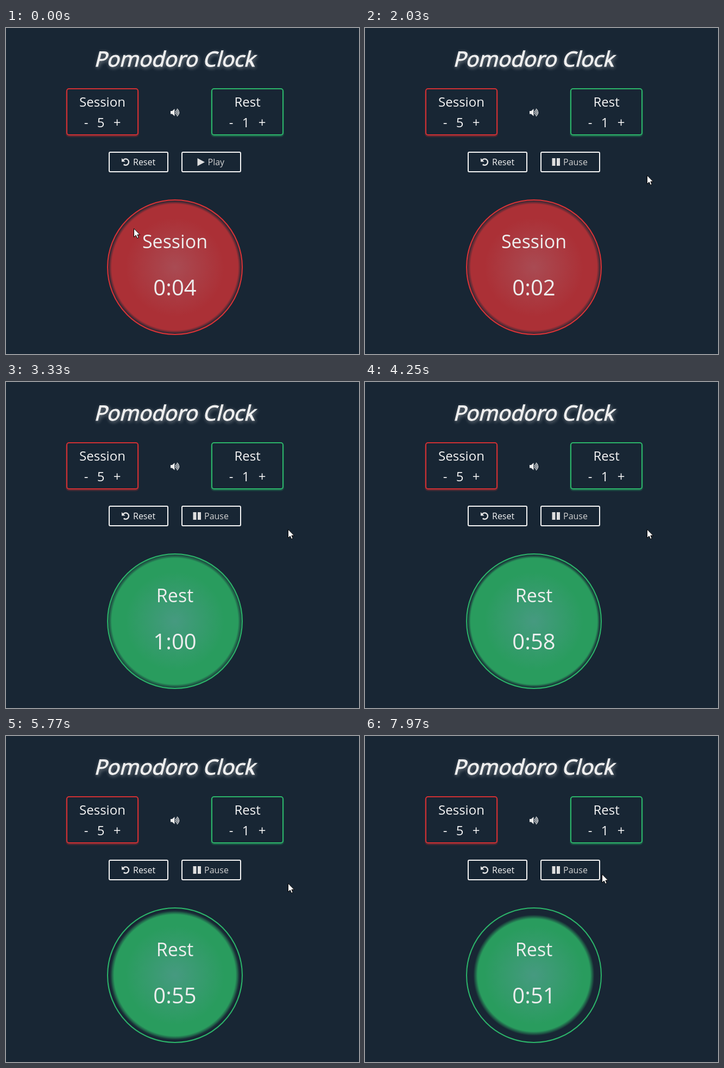
Recreate the animation shown at these times as an HTML page. Size 650x601 px, loop 8000 ms.

```html
<!DOCTYPE html>
<html lang="en">
<head>
<meta charset="utf-8">
<title>Pomodoro Clock</title>
<style>
  html, body { margin: 0; width: 100%; height: 100%; overflow: hidden; background: #182634; }
  svg { display: block; width: 650px; height: 601px; }
  text { font-family: "Open Sans", sans-serif; fill: #f4f4f4; }
  .mid { text-anchor: middle; }
  .box { fill: none; stroke-width: 2; }
  .set { font-size: 24px; }
  .btn { font-size: 16px; }
  .dim text { fill: #d2d2d2; }
  .dim path { fill: #dedede; }
  .title { font-size: 38.4px; fill: #eee; stroke: #eee; stroke-width: 1.2;
    text-shadow: 2px 2px 7px rgba(255, 255, 255, .35); }
</style>
</head>
<body>
<svg viewBox="0 0 650 601">
  <defs>
    <radialGradient id="fill" gradientUnits="userSpaceOnUse" cx="311" cy="441" r="130">
      <stop offset="0"/><stop offset=".7"/><stop/><stop stop-opacity=".5"/><stop stop-opacity="0"/>
    </radialGradient>
    <radialGradient id="rim" gradientUnits="userSpaceOnUse" cx="311" cy="441" r="123">
      <stop offset=".945" stop-color="#182634" stop-opacity="0"/>
      <stop offset=".972" stop-color="#182634" stop-opacity=".45"/>
      <stop offset="1" stop-color="#182634" stop-opacity=".75"/>
    </radialGradient>
    <filter id="soft" x="-10%" y="-10%" width="120%" height="130%">
      <feGaussianBlur stdDeviation="1.2"/>
    </filter>
  </defs>
  <rect width="650" height="601" fill="#182634"/>

  <text class="title" transform="translate(162 71) skewX(-14)">Pomodoro Clock</text>

  <g id="settings"></g>

  <g fill="#eee" stroke="none">
    <path d="M303 153h3l4.5-4v13.5l-4.500-4h-3z"/>
    <path d="M312.300 153.300q2.300 2.400 0 4.900M313.900 151.200q4.400 4.500 0 9.100M315.300 149.200q6.400 6.500 0 13"
      fill="none" stroke="#eee" stroke-width="1.4" stroke-linecap="round"/>
  </g>

  <rect class="box" x="190" y="229" width="108" height="36" rx="2" stroke="#f4f4f4"/>
  <path d="M215.800 243.600A5.700 5.700 0 1 1 216.700 251.500" fill="none" stroke="#e8e8e8" stroke-width="2.300"/>
  <path d="M213 240v6.500h6.500z" fill="#e8e8e8"/>
  <text class="btn" x="234" y="253">Reset</text>

  <rect id="toggle" class="box" x="324" y="229" width="108" height="36" rx="2" stroke="#f4f4f4"/>
  <g id="play" class="dim">
    <path d="M352.500 240v14.500l13.500-7.250z"/>
    <text class="btn" x="371.500" y="253">Play</text>
  </g>
  <g id="pause" class="dim">
    <path d="M344.500 240h6v14h-6zM353 240h6v14h-6z"/>
    <text class="btn" x="365" y="253">Pause</text>
  </g>

  <circle cx="311" cy="441" r="123" fill="url(#fill)"/>
  <circle cx="311" cy="441" r="123" fill="url(#rim)"/>
  <circle id="ring" cx="311" cy="441" r="124" fill="none" stroke-width="2"/>
  <text id="label" class="mid" x="311" y="406" font-size="34" style="fill:#eee"></text>
  <text id="time" class="mid" x="311" y="493" font-size="40" style="fill:#eee"></text>

  <path id="arrow" d="M.5 .8V16.500L4.200 13.100L6.600 18.500L9.200 17.400L6.900 12.100H11.600Z"
    fill="#fff" stroke="#000" stroke-width="1"/>
  <path id="hand" d="M5 14V2.200Q5 .6 6.500 .6T8 2.200V7.500Q8 6.300 9.400 6.300T11 7.800Q11.200 6.900 12.300 6.900T13.800 8.600
    Q14.100 7.900 15 7.900Q16.400 7.900 16.400 9.600V14.500Q16.400 17 14.500 18.800V21.500H6.500V19.200L1 12.800
    Q.2 11.600 1.200 10.800T3.200 11.300Z" fill="#fff" stroke="#000" stroke-width="1"/>
</svg>
<script>
const $ = id => document.getElementById(id);
const LOOP = 8000;
const SESSION = { name: "Session", line: "#dc3336", core: "#a94b53", edge: "#ab3036" };
const REST = { name: "Rest", line: "#2cb56a", core: "#469a80", edge: "#299c5e" };

// start time, cursor shape, left, top
const MOVES = [
  [0, "arrow", 235, 369], [170, "arrow", 305, 309], [320, "arrow", 329, 272],
  [470, "hand", 331, 262], [640, "hand", 343, 248], [790, "hand", 343, 246],
  [1110, "hand", 347, 245], [1260, "arrow", 471, 258], [1430, "arrow", 519, 271],
  [7970, "arrow", 436, 254]
];
const PRESS = 790, RELEASE = 960;
const TICKS = [1580, 2030, 2510, 2820, 3330, 3760, 4250, 4850, 5310, 5770, 6230, 6700, 7330, 7800];
const SESSION_LEFT = 4, REST_LENGTH = 60, FULL = 123;

function settingBox(x, name, value, color) {
  const item = (dx, y, s) => `<text class="set mid" x="${x + dx}" y="${y}">${s}</text>`;
  return `<rect class="box" x="${x + 1}" y="114" width="131" height="85" rx="4" stroke="${color}" opacity=".6" filter="url(#soft)"/>
    <rect class="box" x="${x + 1}" y="112" width="131" height="85" rx="4" stroke="${color}" style="fill:#182634"/>` +
    item(66.5, 145, name) + item(36.5, 183, "-") + item(63.5, 183, value) + item(93.5, 183, "+");
}
$("settings").innerHTML =
  settingBox(111, "Session", 5, "#d23033") + settingBox(378, "Rest", 1, "#2cb56a");

const stops = [...document.querySelectorAll("#fill stop")];

function drawDial(mode, seconds) {
  const radius = mode === REST ? FULL * seconds / REST_LENGTH : FULL - seconds * .75;
  stops.forEach((s, i) => s.setAttribute("stop-color", i ? mode.edge : mode.core));
  [-1, 3, 7].forEach((d, i) => stops[i + 2].setAttribute("offset", (radius + d) / 130));
  $("ring").setAttribute("stroke", mode.line);
  $("label").textContent = mode.name;
  $("time").textContent = Math.floor(seconds / 60) + ":" + String(seconds % 60).padStart(2, "0");
}

function drawCursor(t) {
  const [, shape, x, y] = MOVES.filter(m => m[0] <= t).pop();
  for (const id of ["arrow", "hand"]) $(id).style.display = id === shape ? "" : "none";
  $(shape).setAttribute("transform", `translate(${x} ${y})`);
}

function render(t) {
  const ticks = TICKS.filter(k => k <= t).length;
  if (ticks <= SESSION_LEFT) drawDial(SESSION, SESSION_LEFT - ticks);
  else drawDial(REST, REST_LENGTH + SESSION_LEFT + 1 - ticks);

  const running = t >= RELEASE;
  $("play").style.display = running ? "none" : "";
  $("pause").style.display = running ? "" : "none";
  $("toggle").style.fill = t >= PRESS && !running ? "rgba(255,255,255,.12)" : "none";
  drawCursor(t);
}

const start = performance.now();
function loop() {
  render((performance.now() - start) % LOOP);
  requestAnimationFrame(loop);
}
loop();
</script>
</body>
</html>
```
